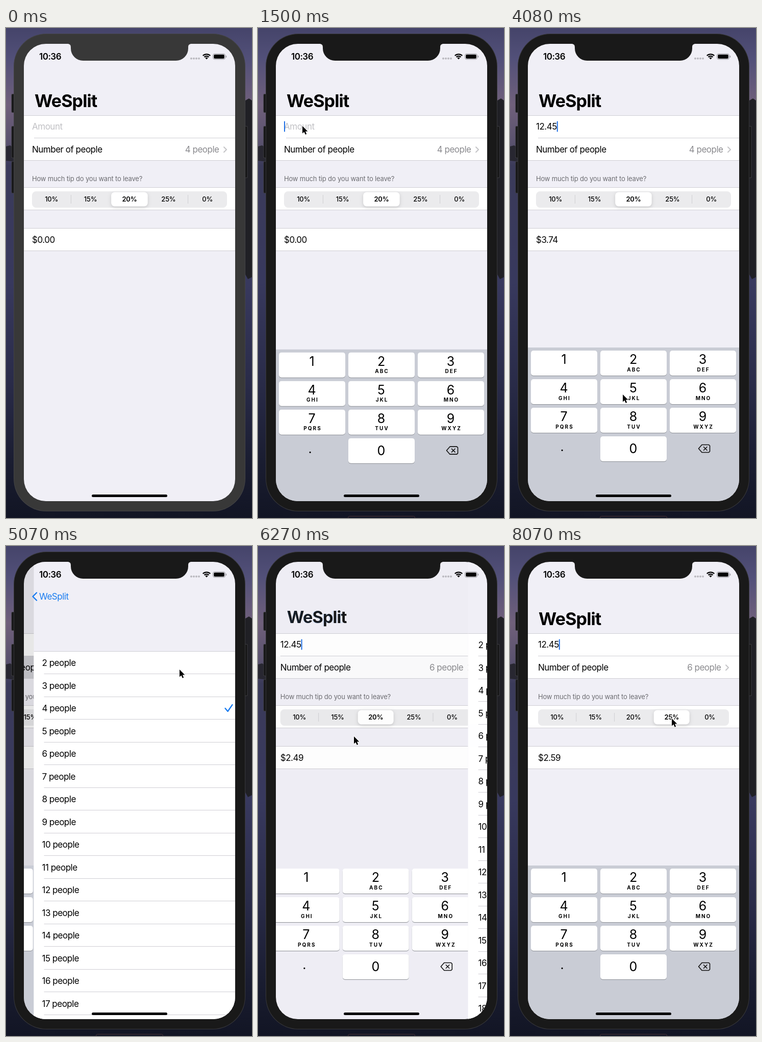
Recreate the animation shown at these times as an HTML page with a canvas. Size 482 by 960 pixels, loop 8.28 s.

```html
<!DOCTYPE html>
<html lang="en">
<head>
<meta charset="utf-8">
<title>Bill splitter</title>
<style>
html, body { margin: 0; height: 100%; overflow: hidden; background: #141724; }
canvas { display: block; }
</style>
</head>
<body>
<canvas id="stage" width="482" height="960"></canvas>
<script>
const LOOP = 8280;
const FOCUS = 900, KEYBOARD = 1100, PUSH = 4770, SETTLE = 5280, PICK = 5700, POP = 6020, POP_END = 6465, TIP = 7110;
const PAGE = '#f0eff6', LINE = '#cfced4', BLUE = '#187bf0', GRAY = '#8a8a8e';
const KEYS = ['1', '2 ABC', '3 DEF', '4 GHI', '5 JKL', '6 MNO', '7 PQRS', '8 TUV', '9 WXYZ', '.', '0'];
const TIPS = [10, 15, 20, 25, 0];
// time and character of each key press
const TYPED = [[2570, '1'], [2850, '2'], [3230, '.'], [3530, '4'], [3820, '5']];
// pointer stops: time, x, y
const POINTER = [
  [420, -14, 420], [900, 87, 192], [1560, 87, 192], [2040, 114, 652], [2680, 114, 652],
  [2840, 228, 660], [2930, 228, 660], [3210, 100, 822], [3310, 100, 822], [3500, 112, 716],
  [3610, 112, 716], [3790, 221, 718], [4110, 221, 718], [4650, 340, 242], [5100, 340, 242],
  [5490, 188, 373], [6480, 188, 373], [7050, 317, 338], [LOOP, 317, 338]
];
const ARROW = new Path2D('M0 0V14.5L3.4 11.4L5.8 16.8L8.2 15.7L5.9 10.5H10.4Z');
const NOTCH = new Path2D('M120 30V31C125 31 127 33 127 38V40A24 24 0 0 0 151 64H333A24 24 0 0 0 357 40V38C357 33 359 31 364 31V30Z');

const c = document.getElementById('stage').getContext('2d');
const clamp = v => Math.min(1, Math.max(0, v));
const spring = ms => {
  const k = Math.max(0, ms) * 0.016;
  return 1 - (1 + k) * Math.exp(-k);
};

function box(x, y, w, h, color, radius = 0) {
  c.fillStyle = color;
  c.beginPath();
  c.roundRect(x, y, w, h, radius);
  c.fill();
}

function polygon(points, color) {
  c.fillStyle = color;
  c.beginPath();
  points.forEach(p => c.lineTo(...p));
  c.fill();
}

function line(points, color, width) {
  c.strokeStyle = color;
  c.lineWidth = width;
  c.lineCap = c.lineJoin = 'round';
  c.beginPath();
  points.forEach(p => c.lineTo(...p));
  c.stroke();
}

// y is the middle of the capital letters; returns the width
function text(str, x, y, { size = 17, weight = 400, color = '#000', align = 'left', track = -0.029 * size } = {}) {
  c.font = `${weight} ${size}px Inter, sans-serif`;
  c.letterSpacing = track + 'px';
  c.textAlign = align;
  c.fillStyle = color;
  c.fillText(str, x, y + size * 0.364);
  return c.measureText(str).width;
}

function faded(alpha, draw) {
  c.save();
  c.globalAlpha *= clamp(alpha);
  draw();
  c.restore();
}

function gradient(stops) {
  const g = c.createLinearGradient(0, 0, 0, 960);
  stops.forEach(([y, color]) => g.addColorStop(y / 960, color));
  return g;
}

function desktop() {
  box(0, 0, 482, 960, gradient([[0, '#45446a'], [60, '#525079'], [150, '#70607b'], [225, '#5a526e'],
    [270, '#3b3b5a'], [500, '#38395e'], [700, '#292b48'], [850, '#1a1d31'], [960, '#121524']]));
  polygon([[0, 232], [8, 230], [20, 238], [20, 262], [0, 260]], '#282731');
  polygon([[462, 146], [476, 138], [482, 142], [482, 488], [474, 492], [462, 470]], '#202025');
}

function phone(focused) {
  for (const [x, y, h] of [[10.5, 129, 37], [10.5, 192, 63], [10.5, 261, 63], [466.5, 192, 102]]) {
    box(x, y, 7, h, '#39393c', 2);
    box(x + 1, y + 1, 5, h - 2, '#161617', 2);
  }
  box(15, 11, 454, 936, focused ? '#38383b' : '#434345', 64);
  box(16, 12, 452, 934, focused ? '#191919' : '#383838', 63);
  if (focused) {
    c.strokeStyle = '#4a3336';
    c.lineWidth = 1;
    c.beginPath();
    c.roundRect(176.5, 956.5, 131, 12, 3);
    c.stroke();
  }
}

function statusBar() {
  text('10:36', 65, 56, { weight: 600 });
  for (let i = 0; i < 4; i++) box(361 + i * 5, 57.8, 4, 4, '#bbbac0', 2);
  c.strokeStyle = c.fillStyle = '#000';
  c.lineCap = 'butt';
  c.lineWidth = 2.3;
  for (const r of [10.2, 6.4]) {
    c.beginPath();
    c.arc(393, 61.5, r, -Math.PI * 0.75, -Math.PI * 0.25);
    c.stroke();
  }
  c.beginPath();
  c.moveTo(393, 61.5);
  c.arc(393, 61.5, 3.8, -Math.PI * 0.75, -Math.PI * 0.25);
  c.fill();
  c.strokeStyle = '#96959b';
  c.lineWidth = 1;
  c.beginPath();
  c.roundRect(405.5, 50.5, 24, 11, 3.5);
  c.stroke();
  box(407.2, 52, 20.6, 8, '#000', 2);
  box(430.8, 54, 1.4, 4, '#96959b', 1);
}

function section(top, bottom) {
  box(35, top, 414, bottom - top, '#fff');
  box(35, top, 414, 1, LINE);
  box(35, bottom - 1, 414, 1, LINE);
}

function segments(t, left, width) {
  const step = width / 5, pos = 2 + spring(t - TIP), selected = Math.round(pos);
  box(left, 320, width, 32, '#ebebed', 8);
  for (let i = 1; i < 5; i++)
    if (i !== selected && i !== selected + 1) box(left + i * step - 0.5, 327, 1, 17, '#cfcfd3');
  c.save();
  c.shadowColor = 'rgba(0,0,0,.16)';
  c.shadowBlur = 6;
  c.shadowOffsetY = 2;
  box(left + pos * step + 2.3, 321.5, step - 4.8, 28, '#fff', 7);
  c.restore();
  TIPS.forEach((tip, i) => text(tip + '%', left + (i + 0.5) * step, 335.5,
    { size: 13, weight: i === selected ? 600 : 500, align: 'center', track: -0.2 }));
}

function form(t) {
  const inset = t > SETTLE ? 4 : 0, left = 51 + inset, right = 433 - inset;
  const people = t > PICK ? 6 : 4, tip = t > TIP ? 25 : 20;
  const keys = TYPED.filter(k => t >= k[0]);
  const amount = keys.map(k => k[1]).join('');
  const share = (Number(amount) * (1 + tip / 100) / people + 1e-9).toFixed(2);

  box(35, 31, 414, 896, PAGE);
  section(171, 260);
  if (t > PUSH - 60) faded(1 - spring(t - POP), () => box(35, 216, 414, 43, '#d1d1d6'));
  box(55, 215, 394, 1, LINE);
  const width = text(amount || 'Amount', left, 193, { color: amount ? '#000' : '#c0c0c4' });
  if (t > KEYBOARD) {
    const phase = (t - (keys.length ? keys.at(-1)[0] : KEYBOARD + 100)) % 1000;
    const alpha = phase < 680 ? 1 - clamp((phase - 500) / 150) : clamp((phase - 860) / 140);
    faded(alpha, () => box(left + (amount ? width : 0), 182.5, 2, 21, '#1f70e6', 1));
  }
  text('Number of people', left, 238);
  text(people + ' people', right - 15.5, 238, { color: GRAY, align: 'right' });
  line([[right - 6, 233.3], [right - 1, 238.3], [right - 6, 243.3]], '#c4c4c7', 2);

  text('How much tip do you want to leave?', left, 295, { size: 13, color: '#6d6d72', track: -0.18 });
  section(312, 357);
  segments(t, left, right - left);
  section(392, 437);
  text('$' + share, left, 414.5);
}

function keyboard(t) {
  const rise = spring(t - KEYBOARD);
  if (!rise) return;
  c.save();
  c.translate(0, 301 * (1 - rise));
  if (t < SETTLE || t > POP_END) box(35, 626, 414, 301, '#c9ccd5');
  const pressed = TYPED.find(k => t >= k[0] && t < k[0] + 110);
  KEYS.forEach((key, i) => {
    const [digit, letters] = key.split(' ');
    const x = 41 + i % 3 * 136, y = 632 + Math.floor(i / 3) * 56, middle = x + 65;
    const down = pressed && pressed[1] === digit;
    if (digit !== '.' || down) {
      box(x, y + 1, 130, 49, '#8d9096', 5);
      box(x, y, 130, 49, down && digit !== '.' ? '#abb8c9' : '#fff', 5);
    }
    if (digit === '.') text(digit, middle - 4, y + 20, { size: 25, align: 'center', track: 0 });
    else text(digit, middle - 0.5, y + (digit === '0' ? 24 : 17), { size: 25, align: 'center', track: 0 });
    if (letters) text(letters, middle + 1, y + 37, { size: 10, weight: 700, align: 'center', track: 2 });
  });
  line([[369.5, 824], [376, 816.5], [389.5, 816.5], [391.5, 818.5], [391.5, 829.5], [389.5, 831.5], [376, 831.5], [369.5, 824]], '#111', 1.6);
  line([[379.5, 820.8], [386, 827.2]], '#111', 1.6);
  line([[386, 820.8], [379.5, 827.2]], '#111', 1.6);
  c.restore();
}

function peopleList(t) {
  const settled = t > SETTLE, top = settled ? 171 : 206, inset = settled ? 4 : 0;
  const chosen = t > PICK ? 4 : 2;
  box(35, 31, 414, 896, PAGE);
  box(35, top, 414, 927 - top, '#fff');
  box(35, top, 414, 1, LINE);
  for (let i = 0; i < 18; i++) {
    const y = top + i * 44.5, tick = 410 - inset;
    if (i === 4 && t > PICK - 60) faded(1 - spring(t - POP + 120), () => box(35, y, 414, 44.5, '#d1d1d6'));
    text(i + 2 + ' people', 51 + inset, y + 23);
    box(55, Math.round(y + 44), 394, 1, LINE);
    if (i === chosen) line([[tick, y + 23], [tick + 5, y + 29], [tick + 14, y + 16]], BLUE, 2.3);
  }
}

// the large title shrinks into the back button
function title(p) {
  const x = 56 + 9 * p, y = 143 - 44 * p, size = 34 - 17 * p;
  faded(1 - p, () => text('WeSplit', x, y, { size, weight: 700, track: -0.025 * size }));
  faded(p, () => text('WeSplit', x, y, { size, color: BLUE }));
  faded(2 * p - 1, () => line([[60, 91.5], [52.5, 99], [60, 106.5]], BLUE, 2.4));
}

function pointer(t) {
  const i = POINTER.findIndex(p => p[0] > t);
  if (i < 1) return;
  const [t0, x0, y0] = POINTER[i - 1], [t1, x1, y1] = POINTER[i];
  const u = (t - t0) / (t1 - t0), e = u * u * (3 - 2 * u);
  c.save();
  c.translate(x0 + (x1 - x0) * e, y0 + (y1 - y0) * e);
  c.strokeStyle = '#fff';
  c.lineWidth = 1.8;
  c.lineJoin = 'round';
  c.stroke(ARROW);
  c.fillStyle = '#000';
  c.fill(ARROW);
  c.restore();
}

function render(t) {
  const focused = t > FOCUS, p = spring(t - PUSH) - spring(t - POP);
  desktop();
  phone(focused);

  c.save();
  c.beginPath();
  c.roundRect(35, 31, 414, 896, 43);
  c.clip();
  c.save();
  c.translate(-124 * p, 0);
  form(t);
  box(35, 31, 538, 896, `rgba(0,0,0,${p * 0.1})`);
  keyboard(t);
  c.restore();
  if (p > 0.002) {
    c.save();
    c.translate(414 * (1 - p), 0);
    peopleList(t);
    c.restore();
  }
  title(clamp(p * 1.05));
  statusBar();
  box(168, 914, 148, 5, '#000', 2.5);
  c.restore();

  c.fillStyle = focused ? '#191919' : '#383838';
  c.fill(NOTCH);
  pointer(t);
}

function tick() {
  render(performance.now() % LOOP);
  requestAnimationFrame(tick);
}
tick();
</script>
</body>
</html>
```
